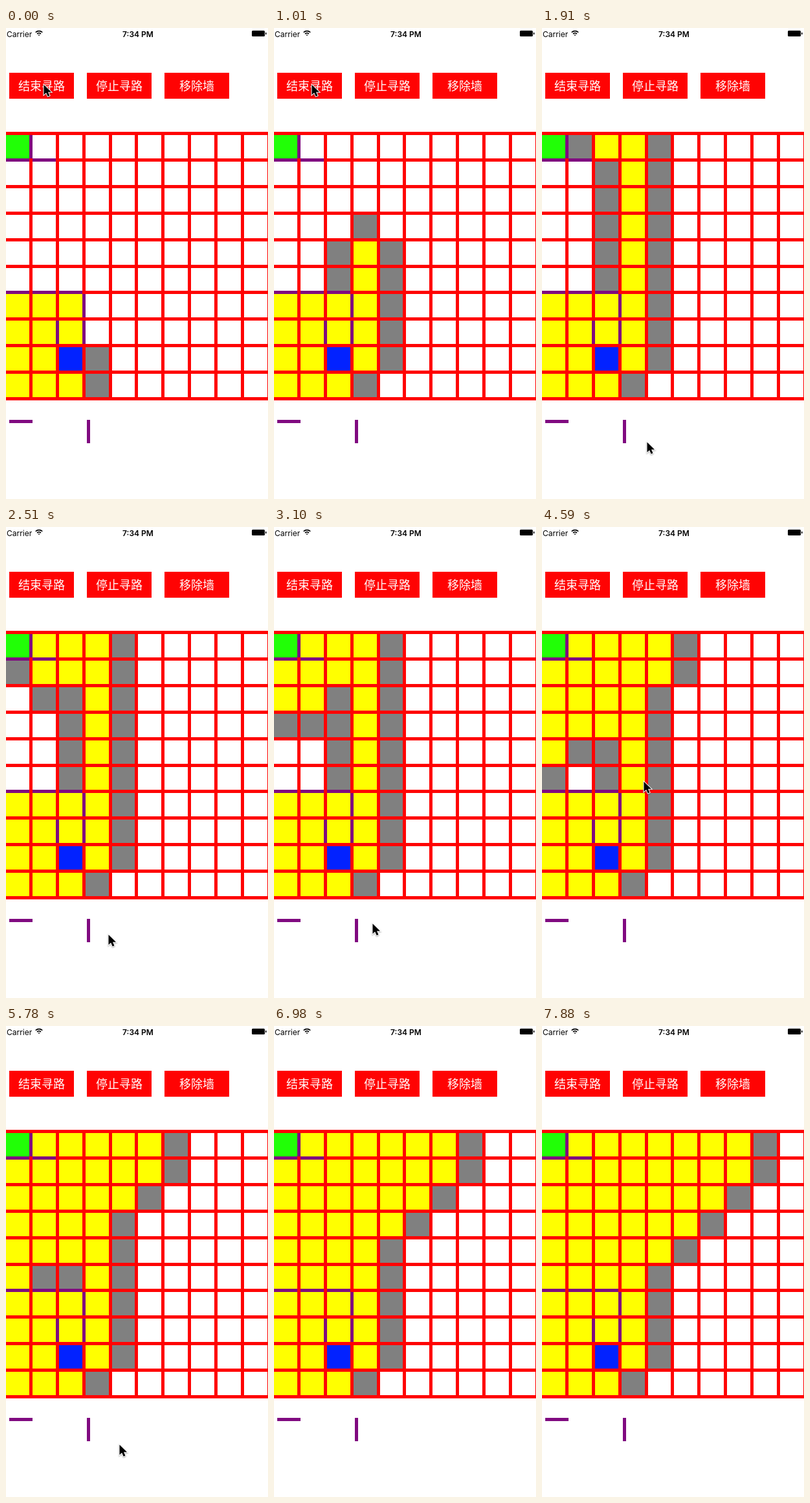
Write an HTML page with a canvas that moves like this. It is 405 by 726 pixels and loops after 8000 ms.

```html
<!DOCTYPE html>
<html lang="zh-CN">
<head>
<meta charset="utf-8">
<title>寻路</title>
<style>
html, body { margin: 0; width: 100%; height: 100%; overflow: hidden; background: #fff; }
canvas { display: block; }
</style>
</head>
<body>
<canvas width="405" height="726"></canvas>
<script>
const ctx = document.querySelector('canvas').getContext('2d');
const RED = '#ff0303', PURPLE = '#800a80', SIZE = 10, LOOP = 8000;
const START = [2, 8], GOAL = [0, 0];

// Cell edges; every cell ends 5px before the next one starts.
const cellX = c => Math.round(40.88 * c);
const cellY = r => Math.round(165.2 + 40.88 * r);

// Walls as [column, row]: below a cell, or to the right of it.
const wallsBelow = [[0, 0], [1, 0], [0, 5], [1, 5], [2, 5]];
const wallsRight = [[0, 0], [2, 6], [2, 7], [1, 7]];
const has = (list, c, r) => list.some(([x, y]) => x === c && y === r);

function blocked(c, r, dx, dy) {
  return dx ? has(wallsRight, Math.min(c, c + dx), r)
            : has(wallsBelow, c, Math.min(r, r + dy));
}

// Greedy best-first search by Manhattan distance; ties go to the oldest cell.
function search(steps) {
  const state = { [START]: 'open' }, open = [START];
  const distance = ([c, r]) => Math.abs(c - GOAL[0]) + Math.abs(r - GOAL[1]);
  while (steps-- > 0 && open.length) {
    const next = open.reduce((a, b) => distance(b) < distance(a) ? b : a);
    const [c, r] = next;
    open.splice(open.indexOf(next), 1);
    state[next] = 'closed';
    for (const [dx, dy] of [[0, -1], [-1, 0], [0, 1], [1, 0]]) {
      const x = c + dx, y = r + dy;
      if (x < 0 || y < 0 || x >= SIZE || y >= SIZE) continue;
      if (state[[x, y]] || blocked(c, r, dx, dy)) continue;
      state[[x, y]] = 'open';
      open.push([x, y]);
    }
  }
  return state;
}

// Ticks last 150 ms, a few of them 140 ms; every fourth tick has no search step.
const shortTicks = [0, 1, 2, 4, 16, 24, 36];
const tickStart = [0];
for (let i = 0; i < 53; i++) tickStart.push(tickStart[i] + (shortTicks.includes(i) ? 140 : 150));
const states = tickStart.map((_, n) => search(12 + n - Math.floor((n + 2) / 4)));

// Pointer keys: time, x, y.
const pointer = [
  [0, 58, 87], [1610, 58, 87], [1910, 162, 638], [2060, 165, 653], [2650, 155, 620],
  [3100, 152, 611], [3690, 137, 616], [3840, 137, 616], [4290, 137, 480], [4440, 137, 480],
  [4590, 157, 392], [5630, 172, 628], [5780, 175, 645], [6380, 190, 730], [LOOP, 190, 730]
];

function pointerAt(t) {
  const i = pointer.findIndex(key => key[0] > t);
  const [t0, x0, y0] = pointer[i - 1], [t1, x1, y1] = pointer[i];
  const k = (t - t0) / (t1 - t0);
  return [Math.round(x0 + (x1 - x0) * k), Math.round(y0 + (y1 - y0) * k)];
}

function rect(color, x, y, w, h) {
  ctx.fillStyle = color;
  ctx.fillRect(x, y, w, h);
}

function text(str, x, y, font, color, align = 'center') {
  ctx.font = font;
  ctx.fillStyle = color;
  ctx.textAlign = align;
  ctx.fillText(str, x, y);
}

function drawStatusBar() {
  text('Carrier', 1, 14, '12px Inter, sans-serif', '#000', 'left');
  text('7:34 PM', 204, 14, '600 12px Inter, sans-serif', '#000');
  ctx.strokeStyle = '#000';
  ctx.lineWidth = 1.7;
  for (const radius of [1, 4.2, 7.4]) {
    ctx.beginPath();
    ctx.arc(51, 12, radius, -Math.PI * 0.75, -Math.PI * 0.25);
    ctx.stroke();
  }
  ctx.fillStyle = '#000';
  ctx.beginPath();
  ctx.roundRect(380, 4, 20, 9, 1.5);
  ctx.fill();
  rect('#000', 401, 7, 1.5, 3);
}

function drawButton(label, x) {
  rect(RED, x, 69, 100, 40);
  text(label, x + 50, 95.5, '18px "Noto Sans CJK SC", "Noto Sans CJK", sans-serif', '#fff');
}

function drawGrid(state) {
  rect(RED, 0, 160, 405, 414);
  for (let r = 0; r < SIZE; r++) {
    for (let c = 0; c < SIZE; c++) {
      let color = { open: '#808080', closed: '#ffff00' }[state[[c, r]]] || '#fff';
      if (has([START], c, r)) color = '#0222ff';
      if (has([GOAL], c, r)) color = '#21ff06';
      rect(color, cellX(c), cellY(r), cellX(c + 1) - 5 - cellX(c), cellY(r + 1) - 5 - cellY(r));
    }
  }
  for (const [c, r] of wallsBelow) rect(PURPLE, cellX(c), cellY(r + 1) - 5, 36, 5);
  for (const [c, r] of wallsRight) rect(PURPLE, cellX(c + 1) - 5, cellY(r), 5, 36);
}

const arrow = new Path2D('M0 0V15.5L3.6 12.2L6.2 18L9 16.8L6.5 11.2H11.5Z');

function drawPointer([x, y]) {
  ctx.save();
  ctx.translate(x + 0.5, y + 0.5);
  ctx.shadowColor = 'rgba(0,0,0,.35)';
  ctx.shadowBlur = 2;
  ctx.shadowOffsetY = 1;
  ctx.strokeStyle = '#fff';
  ctx.lineWidth = 2;
  ctx.stroke(arrow);
  ctx.shadowColor = 'transparent';
  ctx.fillStyle = '#000';
  ctx.fill(arrow);
  ctx.restore();
}

function draw(now) {
  const t = now % LOOP;
  const tick = tickStart.findLastIndex(start => start <= t);
  rect('#fff', 0, 0, 405, 726);
  drawStatusBar();
  drawButton('结束寻路', 5);
  drawButton('停止寻路', 125);
  drawButton('移除墙', 245);
  drawGrid(states[tick]);
  rect(PURPLE, 5, 604, 36, 5);
  rect(PURPLE, 125, 604, 5, 36);
  drawPointer(pointerAt(tickStart[tick]));
}

const began = performance.now();
function loop() {
  draw(performance.now() - began);
  requestAnimationFrame(loop);
}
loop();
</script>
</body>
</html>
```
